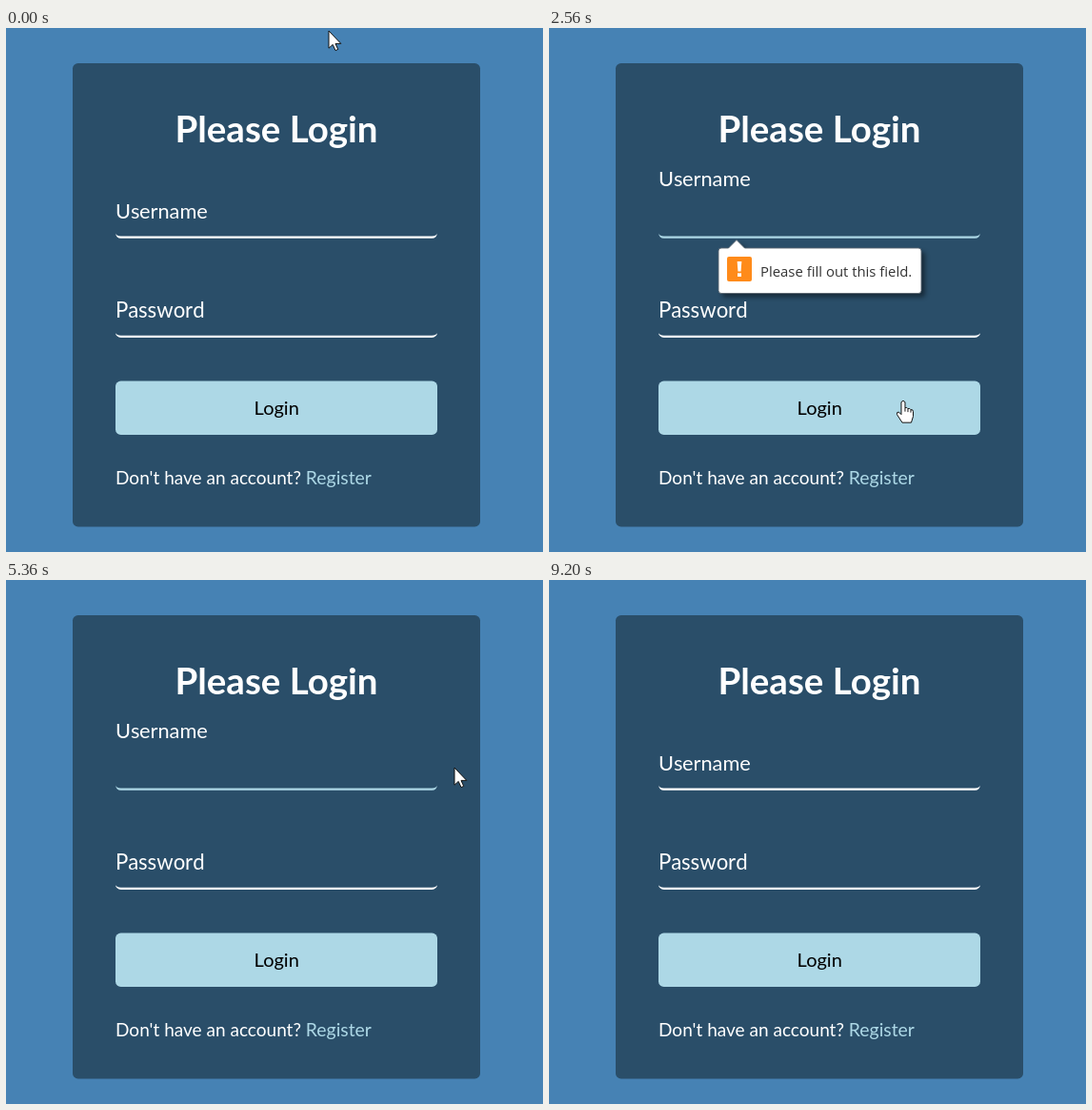
These frames come from a looping animation (564 by 550 pixels, 9.28 s). An HTML page with a canvas:

```html
<!DOCTYPE html>
<html lang="en">
<head>
<meta charset="utf-8">
<title>Login form</title>
<style>
  html, body { margin: 0; width: 100%; height: 100%; overflow: hidden; background: #4682b4; }
  canvas { display: block; width: 564px; height: 550px; }
</style>
</head>
<body>
<canvas id="stage"></canvas>
<script>
const W = 564, H = 550, LOOP = 9280, STEP = 80;
const LIGHT = '#add8e6', WHITE = '#fff';
const RISE = 33.75, WAVE_TIME = 200, WAVE_DELAY = 50;
const FIELD = { left: 115, right: 453, radius: 5.6, line: 2.25 };

const ratio = window.devicePixelRatio || 1;

function setup(canvas) {
  canvas.width = W * ratio;
  canvas.height = H * ratio;
  const context = canvas.getContext('2d');
  context.scale(ratio, ratio);
  return context;
}

const stage = setup(document.getElementById('stage'));
const bubble = setup(document.createElement('canvas'));
let ctx = stage;

// Each focus entry is [focus time, blur time].
const fields = [
  { label: 'Username', size: 21.8, base: 199.8, bottom: 220.8, focus: [[1948, 3866], [4620, 5800]] },
  { label: 'Password', size: 22.2, base: 304.3, bottom: 325, focus: [[6700, 7920]] }
];

// Pointer stops: time, x, y.
const route = [
  [0, 339, 3], [900, 337, 130], [1600, 330, 400], [1880, 329.6, 417], [2320, 329.6, 417],
  [2920, 450, 345], [3280, 553, 280], [3520, 556, 276], [3860, 476, 236],
  [4400, 262, 204], [4720, 262, 204], [5360, 471, 197], [5640, 489, 112],
  [5880, 489, 112], [6500, 300, 305], [6860, 300, 305], [7520, 422, 355],
  [7880, 489, 300], [8640, 434, 2], [8720, 434, -30]
];

const clamp = v => Math.max(0, Math.min(1, v));

function bezier(a, b, s) {
  const r = 1 - s;
  return 3 * a * s * r * r + 3 * b * s * s * r + s * s * s;
}

// cubic-bezier(0.68, -0.55, 0.265, 1.55)
function backEase(x) {
  if (x <= 0) return 0;
  if (x >= 1) return 1;
  let lo = 0, hi = 1;
  for (let i = 0; i < 24; i++) {
    const mid = (lo + hi) / 2;
    if (bezier(0.68, 0.265, mid) < x) lo = mid; else hi = mid;
  }
  return bezier(-0.55, 1.55, lo);
}

function text(str, x, y, font, color, align = 'left') {
  ctx.font = font;
  ctx.fillStyle = color;
  ctx.textAlign = align;
  ctx.fillText(str, x, y);
}

function box(x, y, w, h, r, color) {
  ctx.beginPath();
  ctx.roundRect(x, y, w, h, r);
  ctx.fillStyle = color;
  ctx.fill();
}

const lato = (size, weight = 400) => `${weight} ${size}px Lato, sans-serif`;

function underline(bottom, color) {
  const { left, right, radius: r, line } = FIELD;
  const top = bottom - r;
  ctx.beginPath();
  ctx.moveTo(left, top);
  ctx.ellipse(left + r, top, r, r, 0, Math.PI, Math.PI / 2, true);
  ctx.ellipse(right - r, top, r, r, 0, Math.PI / 2, 0, true);
  ctx.ellipse(right - r, top, r, r - line, 0, 0, Math.PI / 2);
  ctx.ellipse(left + r, top, r, r - line, 0, Math.PI / 2, Math.PI);
  ctx.fillStyle = color;
  ctx.fill();
}

function drawField(f, t) {
  const active = f.focus.find(([on, off]) => t >= on && t < off);
  underline(f.bottom, active ? LIGHT : WHITE);

  const font = lato(f.size);
  [...f.label].forEach((ch, i) => {
    const part = time => backEase((t - time - i * WAVE_DELAY) / WAVE_TIME);
    const lift = f.focus.reduce((sum, [on, off]) => sum + part(on) - part(off), 0);
    ctx.font = font;
    const x = 115 + ctx.measureText(f.label.slice(0, i)).width;
    text(ch, x, f.base - RISE * lift, font, WHITE);
  });

  if (active && (t - active[0]) % 1000 < 500) {
    ctx.fillStyle = WHITE;
    ctx.fillRect(115.4, f.bottom - 42, 1.5, 23);
  }
}

function bubblePath() {
  const l = 178, r = 391, top = 231, b = 278.5, c = 3;
  ctx.beginPath();
  ctx.moveTo(l + c, top);
  ctx.lineTo(188.5, top);
  ctx.lineTo(197, 222.5);
  ctx.lineTo(205.5, top);
  ctx.arcTo(r, top, r, b, c);
  ctx.arcTo(r, b, l, b, c);
  ctx.arcTo(l, b, l, top, c);
  ctx.arcTo(l, top, r, top, c);
  ctx.closePath();
}

function paintBubble() {
  ctx.save();
  ctx.shadowColor = 'rgba(0,0,0,.45)';
  ctx.shadowBlur = 5 * ratio;
  ctx.shadowOffsetX = ctx.shadowOffsetY = 4 * ratio;
  bubblePath();
  ctx.fillStyle = WHITE;
  ctx.fill();
  ctx.restore();
  ctx.strokeStyle = '#5b6670';
  ctx.lineWidth = 0.9;
  ctx.stroke();

  box(187, 240, 26, 26, 2, '#ff8b1a');
  ctx.beginPath();
  ctx.moveTo(197.7, 245);
  ctx.lineTo(202.3, 245);
  ctx.lineTo(201.6, 255.5);
  ctx.lineTo(198.4, 255.5);
  ctx.fillStyle = WHITE;
  ctx.fill();
  ctx.fillRect(198, 257.3, 4, 3.7);
  text('Please fill out this field.', 222, 261, '14.9px "Open Sans", sans-serif', '#333');
}

// The bubble fades as one layer while it widens from its left edge.
function drawBubble(t) {
  const alpha = clamp((t - 2000) / 120) - clamp((t - 3870) / 120);
  if (alpha <= 0) return;
  bubble.clearRect(0, 0, W, H);
  ctx = bubble;
  ctx.save();
  ctx.translate(178, 0);
  ctx.scale(0.93 + 0.07 * alpha, 1);
  ctx.translate(-178, 0);
  paintBubble();
  ctx.restore();
  ctx = stage;
  ctx.globalAlpha = alpha;
  ctx.drawImage(bubble.canvas, 0, 0, W, H);
  ctx.globalAlpha = 1;
}

const arrow = new Path2D('M0 0V18.2L4.2 14.4L7 20.6L9.7 19.4L7 13.4H12.8Z');
const hand = new Path2D('M-2 1Q0 -1.8 2 1V7Q4 6 5 8Q7 7 8 9Q10.5 8.5 10.5 11V16L8.5 22.5H-1L-6.5 14Q-7 11 -4.5 11.5L-2 14Z');
const knuckles = new Path2D('M2 7V11M5 8V11.5M8 9V12');
const beam = new Path2D('M-5 -9H-1.5L0 -8L1.5 -9H5M0 -8V8M-5 9H-1.5L0 8L1.5 9H5');

function pointerAt(t) {
  const i = route.findIndex(p => p[0] > t);
  if (i < 0) return null;
  const [t0, x0, y0] = route[i - 1], [t1, x1, y1] = route[i];
  const u = (t - t0) / (t1 - t0), k = u * u * (3 - 2 * u);
  return [x0 + (x1 - x0) * k, y0 + (y1 - y0) * k];
}

function drawPointer(t) {
  const p = pointerAt(t);
  if (!p) return;
  const [x, y] = p;
  const inside = x > FIELD.left && x < FIELD.right;
  const overInput = inside && fields.some(f => y > f.bottom - 48 && y < f.bottom);
  const overButton = inside && y > 371 && y < 427;
  ctx.save();
  ctx.translate(x, y);
  ctx.lineJoin = 'round';
  if (overInput) {
    ctx.strokeStyle = '#d5b193';
    ctx.lineWidth = 1.4;
    ctx.stroke(beam);
  } else {
    const shape = overButton ? hand : arrow;
    ctx.fillStyle = WHITE;
    ctx.fill(shape);
    ctx.strokeStyle = '#111';
    ctx.lineWidth = 1;
    ctx.stroke(shape);
    if (overButton) ctx.stroke(knuckles);
  }
  ctx.restore();
}

function draw(t) {
  ctx.fillStyle = '#4682b4';
  ctx.fillRect(0, 0, W, H);
  box(70, 37, 428, 486.5, 5.6, '#2a4e69');
  text('Please Login', 284, 120, lato(38.5, 700), WHITE, 'center');
  fields.forEach(f => drawField(f, t));
  box(115, 370.5, 338, 56.5, 5.6, LIGHT);
  text('Login', 284.2, 406, lato(20), '#000', 'center');
  text("Don't have an account?", 115, 478.7, lato(19.05), WHITE);
  text('Register', 314.8, 478.7, lato(19.4), LIGHT);
  drawBubble(t);
  drawPointer(t);
}

const start = performance.now();

function tick() {
  const t = (performance.now() - start) % LOOP;
  draw(Math.floor(t / STEP) * STEP);
  requestAnimationFrame(tick);
}
tick();
</script>
</body>
</html>
```
